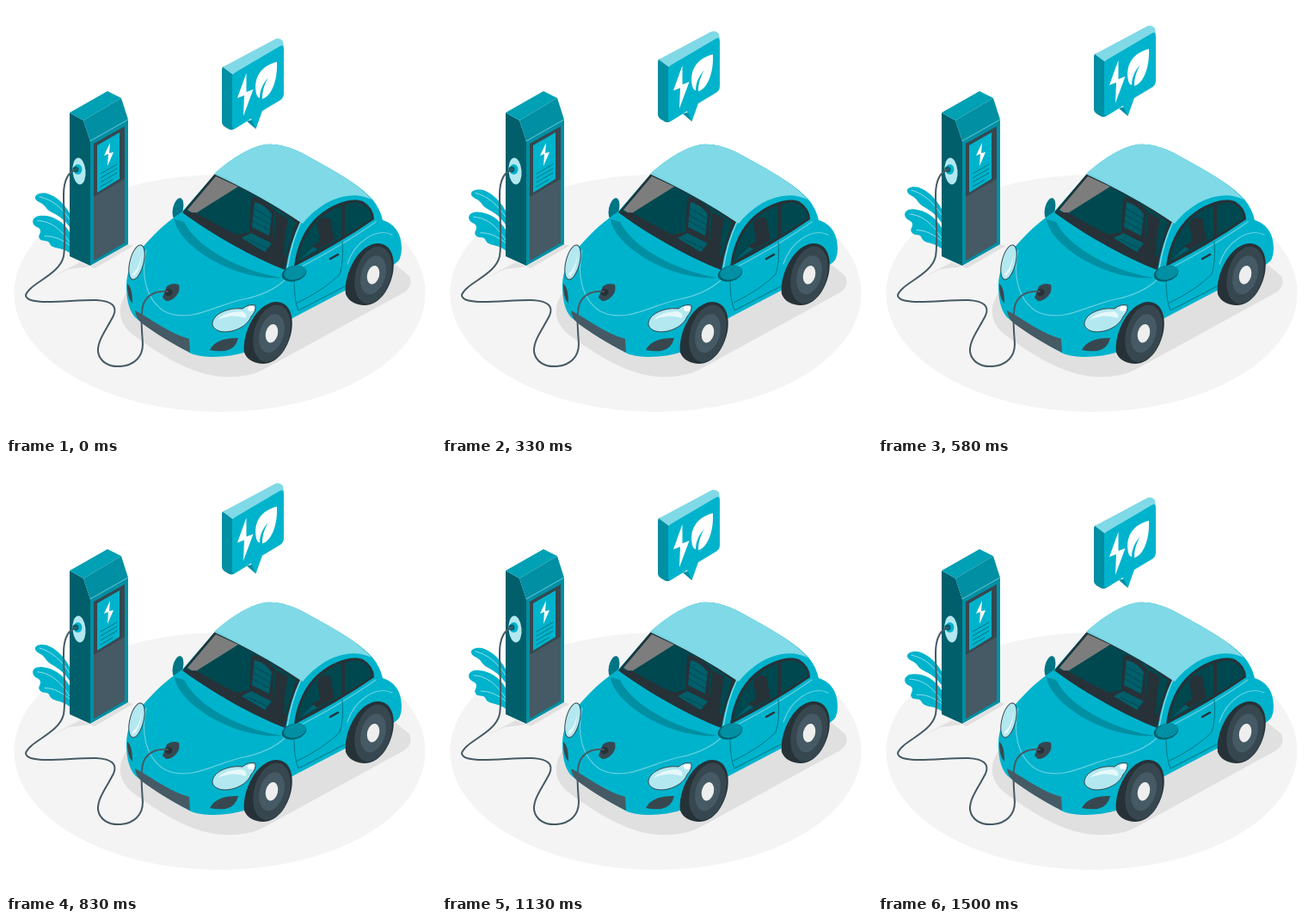
An HTML page for the animation above (1540 ms loop, 500 by 500 pixels).

```html
<!DOCTYPE html>
<html lang="en">
<head>
<meta charset="utf-8">
<title>Electric car charging</title>
<style>
  html, body { margin: 0; width: 100%; height: 100%; overflow: hidden; background: #fff; }
  svg { display: block; width: 100vw; height: 100vh; }
  .main { fill: #00b3cc; }
  .pale { fill: #80d9e6; }
  .lamp { fill: #b3e8f0; }
  .mid { fill: #008fa3; }
  .deep { fill: #005f6b; }
  .glass { fill: #00484f; }
  .ink { fill: #263238; }
  .slate { fill: #37474f; }
  .grey { fill: #455a64; }
  .white { fill: #fff; }
  .shade { fill: #e0e0e0; }
  .line { fill: none; stroke-linecap: round; stroke-linejoin: round; }
  .shine { stroke: #66d1e0; stroke-width: 1.2; }
  .seam { stroke: #007585; stroke-width: 1; }
</style>
</head>
<body>
<svg viewBox="0 0 500 500">
  <defs>
    <g id="wheel">
      <path class="ink" d="M-33 22C-36 0-19-36 4-37C19-37 25-22 22-3C18 18 5 35-11 35C-21 35-30 30-33 22Z"/>
      <ellipse class="slate" cx="-1" rx="20.500" ry="34" transform="rotate(16)"/>
      <ellipse class="grey" cx="-1" rx="14" ry="23" transform="rotate(16)"/>
      <ellipse cx="-1" rx="7" ry="11" fill="#eee" transform="rotate(14)"/>
    </g>
  </defs>

  <ellipse cx="248.500" cy="334" rx="239" ry="138" fill="#f4f4f4"/>
  <path class="shade" d="M98 303L142 277L148 279L103 305ZM50 317L74 304L86 298L98 303L73 306Z"/>
  <path class="shade" d="M143 330C128 348 130 367 146 381C182 408 218 429 252 431Q278 433 299 423L463 333Q474 325 469 314L452 300L330 340Z"/>

  <g id="plant">
    <path class="main" d="M74 241C67 229 58 221 47 218C39 217 33 220 34 224C36 229 42 228 46 234C51 242 63 241 74 257Z"/>
    <path class="main" d="M74 263C67 251 55 244 43 244C34 243 29 249 32 254C34 258 40 257 40 262C40 266 36 268 40 272C44 275 49 271 51 277C54 283 64 280 74 287Z"/>
    <path class="line" stroke="#b3e8f0" stroke-width=".8" d="M39 222C54 225 65 235 74 248M37 250C53 250 65 261 74 275M45 268C56 267 65 272 74 278"/>
  </g>

  <g id="station">
    <path class="deep" d="M74 124L90 133L98 157V302L74 291Z"/>
    <path d="M74 124L118 99L134 107L90 133Z" fill="#00a0b5"/>
    <path class="mid" d="M90 133L134 107L142 132V277L98 302V157Z"/>
    <path class="line" stroke="#80d9e6" stroke-width=".8" d="M98 157L142 132"/>
    <path class="slate" d="M102 160L138 140V275L102 296Z"/>
    <path class="grey" d="M102 222L138 201V275L102 296Z"/>
    <path class="main" d="M106 162L132 147V201L106 217Z"/>
    <path class="white" d="M121 159L114 174L119 172L118 186L125 170L120 171Z"/>
    <path class="line" stroke="#007585" stroke-width="1" d="M110 195L129 184M110 200L129 189M110 205L129 194M110 210L124 202"/>
    <ellipse class="lamp" cx="85" cy="192" rx="7.500" ry="15.500" transform="rotate(-5 85 192)"/>
    <ellipse class="main" cx="83.500" cy="190" rx="5" ry="6"/>
    <circle class="deep" cx="81" cy="190" r="3.500"/>
  </g>

  <g id="car">
    <ellipse cx="200" cy="236" rx="6" ry="13" transform="rotate(12 200 236)" fill="#007585"/>
    <path class="main" d="M140 325C140 308 148 292 162 277C176 261 190 249 205 239L243 195C257 181 282 164 302 161C323 159 342 169 366 183C393 198 414 211 427 226Q435 236 438 249C454 254 460 267 460 282Q460 296 452 300L394 331L333 363L280 402C259 409 231 410 215 404C190 390 164 374 150 362C142 353 140 338 140 325Z"/>
    <path class="line shine" d="M397 300C405 275 430 257 449 266"/>

    <path class="pale" d="M243 194C258 181 281 164 302 161C323 159 342 169 366 183C392 197 413 211 425 225C409 217 390 219 371 230Q355 240 345 253Q302 222 243 194Z"/>

    <path class="ink" d="M205 240L243 195Q301 223 342 251Q330 276 325 307C288 293 240 266 205 240Z"/>
    <path class="glass" d="M208 239L244 198Q302 224 337 251L325 291Q270 270 225 243Z"/>
    <path fill="#7d7d7d" d="M211 237L244 198L270 210L219 242Z"/>
    <path class="ink" d="M208 241L220 240C250 258 290 276 325 295L323 305C286 291 240 265 208 241Z"/>
    <path class="ink" d="M285 222Q300 223 313 239Q309 253 311 271L325 279L321 293L266 266L283 263Z"/>
    <path class="deep" d="M289 228Q300 230 309 242L306 267L286 257ZM274 270L285 264L309 276L301 286Z"/>
    <path class="line" stroke="#00484f" d="M289 236L308 247M288 243L307 254M287 250L306 261M281 271L304 282"/>
    <path class="ink" d="M314 240L328 247L322 286L311 280Z"/>
    <path class="line" stroke="#80d9e6" stroke-width="1.500" d="M243 195Q301 222 343 251Q332 274 327 305"/>

    <path class="ink" d="M335 303C338 278 348 257 363 244C380 229 403 222 415 227Q428 235 428 248Q388 276 335 303Z"/>
    <path class="glass" d="M339 298C342 277 351 259 366 246Q378 236 390 232V269ZM394 231Q410 225 418 233Q425 239 425 247L394 267Z"/>
    <path class="ink" d="M362 252Q368 243 377 247L382 272L350 290L357 278L365 274Z"/>
    <path class="deep" d="M343 294L357 280L362 283Z"/>
    <path class="line shine" d="M336 307Q392 278 430 251"/>
    <path class="line seam" d="M391 274Q393 298 388 312Q370 330 339 345M335 320Q335 342 340 354L394 326"/>
    <path class="line" stroke="#263238" stroke-width="2.500" d="M377 294L386 289"/>

    <path class="mid" d="M196 248C200 279 266 320 321 316C275 309 222 282 207 251Z"/>
    <path class="line shine" d="M163 284C157 310 161 340 184 355C214 370 245 347 276 341Q306 335 324 319"/>
    <path class="grey" d="M150 354C169 364 190 381 213 387L214 403C192 392 171 379 157 368Q151 363 150 354Z"/>
    <path class="slate" d="M141 323Q147 327 147 346Q141 340 141 323ZM237 400C242 390 253 386 270 386Q267 399 255 401Q245 402 237 400Z"/>

    <g class="lamp" stroke="#37474f" stroke-width="1">
      <ellipse cx="152" cy="298" rx="8" ry="20.500" transform="rotate(14 152 298)"/>
      <path d="M240 371C239 358 259 350 275 352Q282 346 290 348Q291 355 285 361C279 378 246 386 240 371Z"/>
    </g>
    <path fill="#e6f8fa" d="M147 311Q155 306 158 287Q156 309 148 315ZM246 365Q255 355 274 355Q281 357 279 363Q264 357 246 365Z"/>
    <ellipse class="white" cx="285" cy="352" rx="4" ry="3"/>

    <path class="slate" d="M182 339L187 326Q193 321 201 324Q203 331 198 337Q193 343 186 343Z"/>
    <ellipse class="ink" cx="189" cy="333" rx="4.500" ry="4"/>

    <ellipse class="deep" cx="335" cy="311" rx="14.500" ry="9" transform="rotate(-14 335 311)"/>
    <ellipse class="mid" cx="336" cy="310" rx="13" ry="8" transform="rotate(-14 336 310)"/>
    <use href="#wheel" x="428" y="313"/>
    <use href="#wheel" x="310" y="381"/>
  </g>

  <path class="line" stroke="#455a64" stroke-width="2" d="M82 190C72 193 67 203 67 220C67 245 70 272 67 291C62 313 28 322 23 336C23 350 77 341 105 342C123 343 130 349 125 360C117 376 106 389 107 402C109 414 120 420 133 419C149 418 159 408 159 393C158 376 156 358 160 346C165 335 174 331 188 332"/>

  <g id="bubble">
    <path class="mid" d="M251 74Q251 70 255 70L267 78V142Q262 146 257 142Q251 139 251 135ZM280 134L290.500 143L293 130Z"/>
    <path class="pale" d="M252 71L312 39Q318 36 322 41L323 47L264 80Z"/>
    <path class="main" d="M263 83Q263 79 267 77L318 47Q323 44 323 50V102Q323 107 318 110L298 122L290.500 143L285 131L269 141Q263 145 263 139Z"/>
    <path class="white" d="M279.500 78L269 107L277 104L276 128L287.500 97L279.500 100Z"/>
    <path class="white" d="M315 65C298 69 287 82 291 102Q292 106 295 107C295 98 299 90 305 83C300 92 298 99 298 108C309 105 316 86 315 65Z"/>
  </g>
</svg>
<script>
  const LOOP = 1540, LEAD = 55;
  const bubble = document.getElementById("bubble");
  const plant = document.getElementById("plant");
  const start = performance.now();

  function draw(now) {
    const phase = ((Math.max(0, now - start) + LEAD) % LOOP) / LOOP;
    const lift = 1 - Math.abs(1 - 2 * phase); // linear up, then down
    bubble.setAttribute("transform", `translate(0 ${1.4 - 20 * lift})`);
    plant.setAttribute("transform", `matrix(1 ${0.1 * lift} 0 1 0 ${0.5 - 14 * lift})`);
    requestAnimationFrame(draw);
  }
  draw(start);
</script>
</body>
</html>
```
